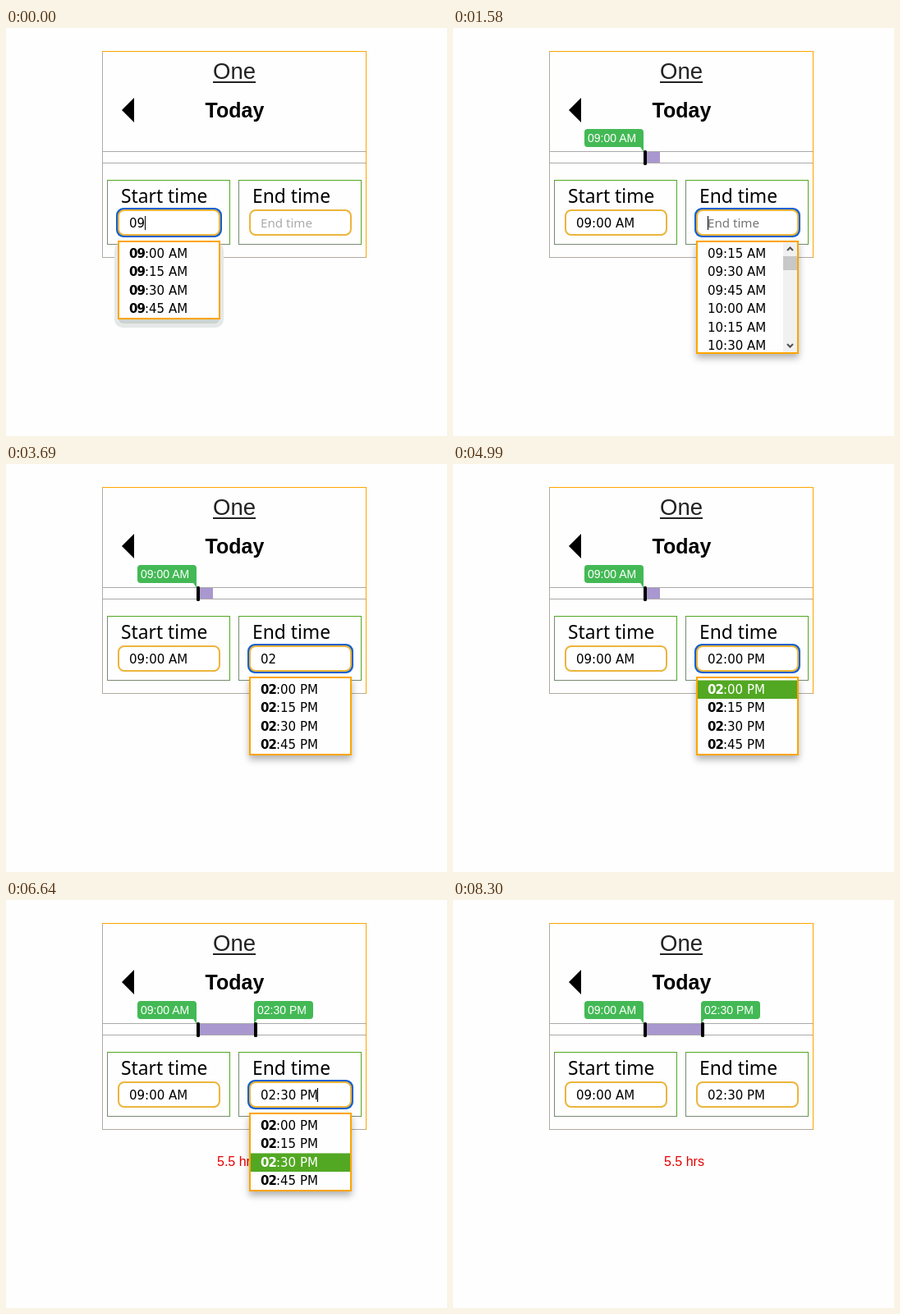
An HTML page for the animation above (9700 ms loop, 537 by 497 pixels).

```html
<!DOCTYPE html>
<html lang="en">
<head>
<meta charset="utf-8">
<style>
html, body { margin: 0; width: 100%; height: 100%; overflow: hidden; background: #fefefe; }
svg { display: block; }
.arial { font-family: "Liberation Sans", Arial, sans-serif; }
.value { font: 15px "DejaVu Sans", sans-serif; }
.value .hit { font-weight: bold; letter-spacing: -.94px; }
.label { font: 22.8px "Noto Sans", sans-serif; }
.hint { font: 15.1px "Noto Sans", sans-serif; }
.soft { filter: drop-shadow(0 5px 4px rgba(0, 0, 0, .3)); }
</style>
</head>
<body>
<svg id="stage" width="537" height="497"></svg>
<script>
const LOOP = 9700;
const ORANGE = '#ffa500', GREEN = '#52a822', BUBBLE = '#43b955';
const START = 150, END = 310; // text edge of each field

const quarters = (hour, half) => ['00', '15', '30', '45'].map(m => `${hour}:${m} ${half}`);
const nine = quarters('09', 'AM'), two = quarters('02', 'PM');
const later = [...nine.slice(1), ...quarters('10', 'AM')];
const zeros = [...nine.slice(1), ...quarters('01', 'PM')];

// Each step: time, then the properties that change. caret is its x, 0 when hidden.
const steps = [
  [0, { field: START, start: '09', end: '', list: nine, hit: 2, pick: -1, caret: 169, hours: '', minutes: 0 }],
  [460, { start: nine[0], pick: 0, caret: 221 }],
  [930, { caret: 0 }],
  [1490, { caret: 221 }],
  [1580, { field: END, list: later, hit: 0, pick: -1, caret: 310 }],
  [2040, { caret: 0 }],
  [2600, { caret: 310 }],
  [3060, { end: '0', caret: 319 }],
  [3150, { list: zeros, hit: 1 }],
  [3590, { end: '02', caret: 329 }],
  [3690, { list: two, hit: 2, caret: 0 }],
  [4150, { caret: 329 }],
  [4710, { caret: 0 }],
  [4990, { end: two[0], pick: 0 }],
  [5080, { hours: '5', minutes: 300 }],
  [5260, { end: two[1], pick: 1, hours: '5.25', minutes: 315 }],
  [5820, { caret: 379 }],
  [6280, { caret: 0 }],
  [6460, { caret: 379 }],
  [6640, { end: two[2], pick: 2, hours: '5.5', minutes: 330 }],
  [6820, { caret: 0 }],
  [7380, { caret: 379 }],
  [7840, { caret: 0 }],
  [8300, { field: 0 }]
];

const rect = (x, y, w, h, fill, more = '') =>
  `<rect x="${x}" y="${y}" width="${w}" height="${h}" fill="${fill}" ${more}/>`;
const text = (x, y, str, cls, more = '') =>
  `<text x="${x}" y="${y}" class="${cls}" ${more}>${str}</text>`;

// One-pixel frame whose top and right sides differ from its left and bottom sides
const frame = (x, y, w, h, bright, dull) =>
  rect(x, y, 1, h, dull) + rect(x, y + h - 1, w, 1, dull) +
  rect(x, y, w, 1, bright) + rect(x + w - 1, y, 1, h, bright);

function base() {
  return rect(0, 0, 537, 497, '#fefefe') +
    frame(117, 28, 322, 252, ORANGE, '#b0aaa0') +
    text(278, 62, 'One', 'arial', 'font-size="27.5" text-anchor="middle" fill="#222"') +
    rect(252, 65, 52, 2, '#222') +
    text(278.5, 109, 'Today', 'arial', 'font-size="25" font-weight="bold" text-anchor="middle"') +
    '<path d="M141 100l15-15v30z"/>' +
    rect(118, 150, 320, 1, '#aaa') + rect(118, 164, 320, 1, '#aaa');
}

function bubble(x, tail, str) {
  return rect(x, 123, 72, 22, BUBBLE, 'rx="4"') +
    `<path d="${tail}" fill="${BUBBLE}"/>` +
    text(x + 4, 139, str, 'arial', 'font-size="14" fill="#fff"');
}

function slider(s) {
  if (s.start.length < 8) return '';
  const stop = Math.round(232 + s.minutes * .2127);
  const handle = x => rect(x, 149, 4, 18, '#000', 'rx="1.5"');
  let out = rect(236, 151, s.minutes ? stop - 236 : 16, 13, '#a998cf') +
    bubble(160, 'M225 140h7v11z', s.start) + handle(232);
  if (s.minutes) out += bubble(stop, `M${stop} 140h7l-7 11z`, s.end) + handle(stop);
  return out;
}

function field(s, x, label, value) {
  const focus = s.field === x;
  let out = frame(x - 27, 185, 150, 79, GREEN, '#788c74') + text(x - 10, 213, label, 'label');
  if (focus) out += rect(x - 16, 219, 129, 36, '#1060d0', 'rx="9"');
  out += rect(x - 13, 222, 123, 30, '#fff', 'rx="7" stroke="#ebb53c" stroke-width="2"');
  out += value ? text(x, 243, value, 'value')
    : text(x, 243, label, 'hint', `fill="${s.start.length < 8 ? '#aaa' : '#757575'}"`);
  if (focus && s.caret) out += rect(s.caret, 229, 1, 17, '#000');
  return out;
}

function scrollbar() {
  return rect(104, 0, 17, 134, '#f1f1f1') + rect(104, 17, 17, 17, '#c8c8c8') +
    '<path d="M109 10l3.5-3.5 3.5 3.5M109 124l3.5 3.5 3.5-3.5" fill="none" stroke="#505050" stroke-width="2"/>';
}

function menu(s) {
  if (!s.field) return '';
  const x = s.field - 14, long = s.list.length > 4, h = long ? 138 : 96;
  const early = s.field === START;
  const rows = s.list.map((item, i) => {
    const y = 2.5 + i * 22.5, on = i === s.pick;
    const str = `<tspan class="hit">${item.slice(0, s.hit)}</tspan>${item.slice(s.hit)}`;
    return (on ? rect(0, y, 121, 22.5, GREEN) : '') +
      text(12, y + 16, str, 'value', `fill="${on ? '#fff' : '#000'}"`);
  }).join('');
  const shade = early
    ? rect(x - 4, 261, 133, 104, '#e4e8e7', 'rx="10"') + rect(x + 1, 300, 123, 60, '#cdd3d1', 'rx="6"')
    : '';
  return shade + rect(x, 259, 125, h, ORANGE, early ? '' : 'class="soft"') +
    rect(x + 2, 261, 121, h - 4, '#fefefe') +
    `<svg x="${x + 2}" y="261" width="121" height="${h - 4}" overflow="hidden">${rows}${long ? scrollbar() : ''}</svg>`;
}

function draw(s) {
  const hours = s.hours && text(257, 324, s.hours + ' hrs', 'arial', 'font-size="16" fill="#e60000"');
  return base() + slider(s) + field(s, START, 'Start time', s.start) +
    field(s, END, 'End time', s.end) + hours + menu(s);
}

const stage = document.getElementById('stage');
const origin = performance.now();
let shown = 0;

function tick() {
  const t = (performance.now() - origin) % LOOP;
  const past = steps.filter(step => step[0] <= t);
  if (past.length !== shown) {
    shown = past.length;
    stage.innerHTML = draw(Object.assign({}, ...past.map(step => step[1])));
  }
  requestAnimationFrame(tick);
}
tick();
</script>
</body>
</html>
```
